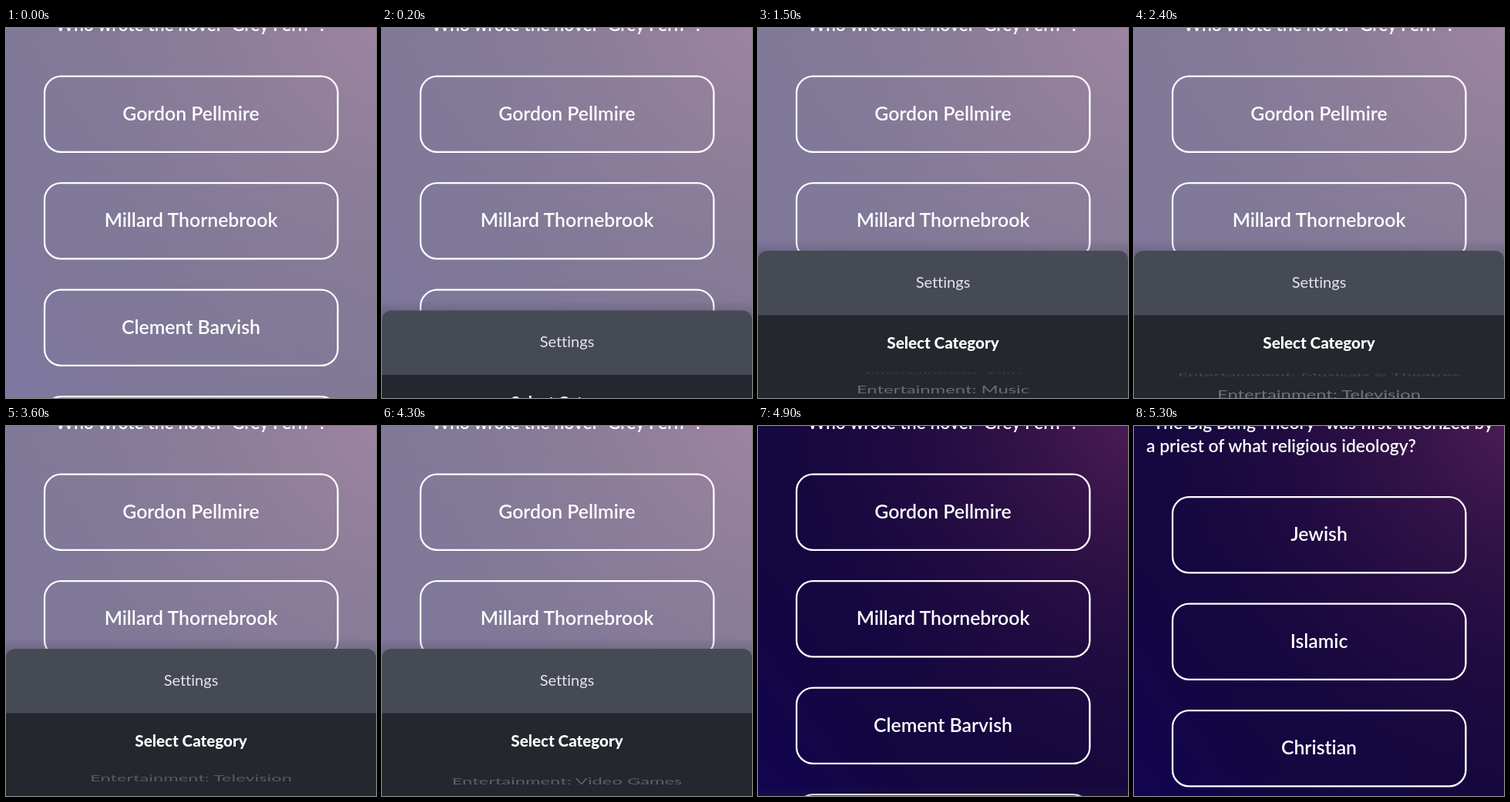
Recreate the animation shown at these times as an HTML page. Size 480 by 480 pixels, loop 8 s.

```html
<!DOCTYPE html>
<html lang="en">
<head>
<meta charset="utf-8">
<style>
  html, body { margin: 0; height: 100%; overflow: hidden; background: #150744; }
  svg { display: block; width: 100%; height: 100%; }
  text { font-family: Lato, sans-serif; fill: #fff; text-anchor: middle; font-variant-ligatures: none; }
  .answer { font-size: 24.8px; font-weight: 600; }
  .question { font-size: 22.9px; font-weight: 600; }
  .left { text-anchor: start; }
  .row { font-size: 24px; }
  .box { fill: none; stroke: #fff; stroke-width: 2.3; }
</style>
</head>
<body>
<svg viewBox="0 0 480 480">
  <defs>
    <linearGradient id="night" x1="0" y1="1" x2="1" y2="0.3">
      <stop offset="0" stop-color="#120450"/>
      <stop offset="0.3" stop-color="#140641"/>
      <stop offset="1" stop-color="#180a3a"/>
    </linearGradient>
    <radialGradient id="glow" gradientUnits="userSpaceOnUse" cx="510" cy="-20" r="480">
      <stop offset="0" stop-color="#56215a" stop-opacity="0.9"/>
      <stop offset="0.35" stop-color="#46194f" stop-opacity="0.6"/>
      <stop offset="0.65" stop-color="#35124a" stop-opacity="0.35"/>
      <stop offset="1" stop-color="#2a1048" stop-opacity="0"/>
    </radialGradient>
    <linearGradient id="shade" x1="0" y1="0" x2="0" y2="1">
      <stop offset="0" stop-color="#302c40" stop-opacity="0"/>
      <stop offset="1" stop-color="#302c40" stop-opacity="0.35"/>
    </linearGradient>
    <clipPath id="wheelClip"><rect y="444" width="480" height="200"/></clipPath>
  </defs>
  <rect width="480" height="480" fill="url(#night)"/>
  <rect width="480" height="480" fill="url(#glow)"/>
  <rect id="veil" width="480" height="480" fill="#fff" opacity="0.46"/>
  <g id="first">
    <text class="question" x="240" y="4">Who wrote the novel “Grey Fern” ?</text>
  </g>
  <g id="second">
    <text class="question left" x="16" y="4">“The Big Bang Theory” was first theorized by</text>
    <text class="question left" x="16" y="33.5">a priest of what religious ideology?</text>
  </g>
  <g id="sheet">
    <rect y="275" width="480" height="26" fill="url(#shade)"/>
    <path d="M0 500V301a12 12 0 0 1 12-12H468a12 12 0 0 1 12 12V500Z" fill="#464a55"/>
    <rect y="372.6" width="480" height="200" fill="#25272e"/>
    <text x="240" y="336.5" font-size="20" style="fill:#e4e5e8">Settings</text>
    <text x="240" y="416" font-size="20.6" font-weight="800">Select Category</text>
    <g id="wheel" clip-path="url(#wheelClip)"></g>
  </g>
</svg>
<script>
const LOOP = 8000, STEP = 100;
const WHEEL_TOP = 445, RADIUS = 130, PITCH = 25;
const HIDDEN = 215;
const $ = id => document.getElementById(id);

function add(parent, tag, attrs, content = '') {
  const node = document.createElementNS('http://www.w3.org/2000/svg', tag);
  for (const key in attrs) node.setAttribute(key, attrs[key]);
  node.textContent = content;
  return parent.appendChild(node);
}

function addAnswers(group, top, names) {
  names.forEach((name, i) => {
    const y = top + i * 138.5;
    add(group, 'rect', { class: 'box', x: 50, y, width: 380.4, height: 98.2, rx: 21.5 });
    add(group, 'text', { class: 'answer', x: 240, y: y + 57.2 }, name);
  });
}
addAnswers($('first'), 62.7, ['Gordon Pellmire', 'Millard Thornebrook', 'Clement Barvish', '']);
addAnswers($('second'), 92.2, ['Jewish', 'Islamic', 'Christian']);

const rows = [
  'Any Category', 'General Knowledge', 'Entertainment: Books', 'Entertainment: Film',
  'Entertainment: Music', 'Entertainment: Musicals & Theatres', 'Entertainment: Television',
  'Entertainment: Video Games', 'Entertainment: Board Games'
].map(name => add($('wheel'), 'text', { class: 'row', y: 8 }, name));

// [time, angle of the first row below the wheel's top edge, in degrees]
const spin = [
  [0, 90], [1000, 90], [1500, -64.5], [1600, -64.5], [1900, -71.3],
  [2100, -71.3], [2400, -110], [2500, -110], [2800, -121.3],
  [3500, -121.3], [3600, -124.2], [3800, -138], [3900, -138], [4300, -146.3], [LOOP, -146.3]
];
// [time, sheet offset]
const slide = [[0, HIDDEN], [500, 0], [4700, 0], [5000, HIDDEN], [LOOP, HIDDEN]];

const easeOut = p => p * (2 - p);

function valueAt(keys, t) {
  const i = keys.findIndex(key => key[0] > t);
  const [t0, a] = keys[i - 1], [t1, b] = keys[i];
  return a + (b - a) * easeOut((t - t0) / (t1 - t0));
}

function drawWheel(angle) {
  rows.forEach((row, i) => {
    const phi = angle + i * PITCH;
    const visible = phi > 5 && phi < 90;
    row.style.display = visible ? '' : 'none';
    if (!visible) return;
    const rad = phi * Math.PI / 180, tilt = Math.sin(rad);
    const y = WHEEL_TOP + RADIUS * (1 - Math.cos(rad));
    row.setAttribute('transform', `translate(240 ${y}) scale(${0.97 + 0.04 * tilt} ${tilt})`);
    row.setAttribute('opacity', 0.55 * tilt);
  });
}

function draw(now) {
  const t = Math.floor(now % LOOP / STEP) * STEP;
  $('veil').style.display = t < 4700 ? '' : 'none';
  $('first').style.display = t < 5000 ? '' : 'none';
  $('second').style.display = t < 5000 ? 'none' : '';
  $('sheet').setAttribute('transform', `translate(0 ${valueAt(slide, t)})`);
  drawWheel(valueAt(spin, t));
  requestAnimationFrame(draw);
}
draw(0);
</script>
</body>
</html>
```
